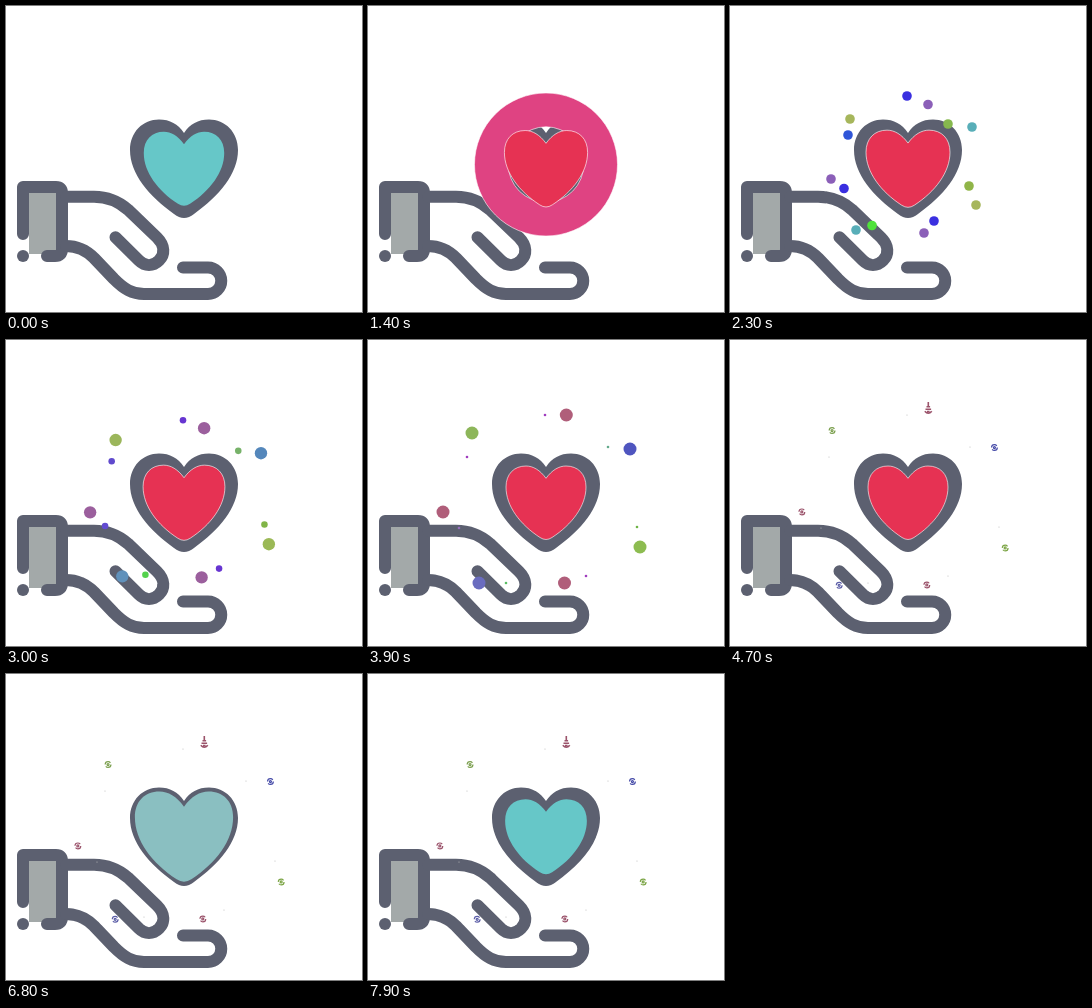
An HTML page that plays this animation: 356 by 306 pixels, repeating every 8 s.

```html
<!DOCTYPE html>
<html lang="en">
<head>
<meta charset="utf-8">
<title>Heart in hand</title>
<style>
  html, body { margin: 0; width: 100%; height: 100%; overflow: hidden; background: #fff; }
  svg { display: block; width: 100vw; height: 100vh; }
</style>
</head>
<body>
<svg viewBox="0 0 356 306">
  <rect x="23" y="186" width="30" height="62" fill="#a3a9a9"/>
  <g fill="none" stroke="#5c6070" stroke-width="12" stroke-linecap="round" stroke-linejoin="round">
    <path d="M17 228V181H50Q56 181 56 187V243Q56 250 49 250H41"/>
    <path d="M17 250h0"/>
    <path d="M60 190.7H88C102 190.7 113 195.7 122 203.7L151 231.5C159 239.5 159 248.5 153 254.5C147 260.5 139 260.5 133 254.5L109.5 231.3"/>
    <path d="M60 240C72 240 80 244 88 252L108 273C118 283 126 288 138 288H202A13.25 13.25 0 0 0 202 261.5H177"/>
  </g>
  <path fill="#5c6070" d="M178 127C172 118 164 113.5 153 113.5C137 113.5 124 126 124 144C124 168 143 190 168 208Q178 216 188 208C213 190 232 168 232 144C232 126 219 113.5 203 113.5C192 113.5 184 118 178 127Z"/>
  <path id="ring" fill-rule="evenodd" stroke="#fff" stroke-width=".6"/>
  <path id="heart" d="M178 138.3C172 130 165 126 158 126C146 126 138 134 138 147C138 166 152 184.5 172 197.5Q178 201.5 184 197.5C204 184.5 218 166 218 147C218 134 210 126 198 126C191 126 184 130 178 138.3Z"/>
  <g id="dots"></g>
  <g id="traces" fill="none"></g>
</svg>
<script>
const LOOP = 8000, STEP = 100;
const RED = [230, 50, 83], TEAL = [102, 199, 200], PALE = [138, 191, 193];
const BLUE = [58, 47, 224], PURPLE = [139, 95, 184], OLIVE = [166, 182, 91],
      SEA = [88, 174, 184], GREEN = [134, 184, 78], ROSE = [176, 94, 122], VIOLET = [160, 60, 190];

const $ = id => document.getElementById(id);
const clamp = (v, a = 0, b = 1) => Math.min(b, Math.max(a, v));
const span = (t, a, b) => clamp((t - a) / (b - a));
const lerp = (a, b, u) => a + (b - a) * u;
const mix = (a, b, u) => a.map((v, i) => lerp(v, b[i], u));
const rgb = c => `rgb(${c.map(v => Math.round(clamp(v, 0, 255)))})`;
const set = (el, attrs) => { for (const k in attrs) el.setAttribute(k, attrs[k]); };
const add = (parent, tag, attrs) => {
  const el = document.createElementNS('http://www.w3.org/2000/svg', tag);
  set(el, attrs);
  return parent.appendChild(el);
};
// Piecewise linear value through [time, value] stops
const track = (t, stops) => {
  let i = 0;
  while (i < stops.length - 2 && t > stops[i + 1][0]) i++;
  const [a, b] = [stops[i], stops[i + 1]];
  return lerp(a[1], b[1], span(t, a[0], b[0]));
};

// Each spark passes `from` at 2.3 s and `to` at 3.9 s
const spark = (big, from, to, c0, c1, steady = false) => ({ big, from, to, c0, c1, steady });
const sparks = [
  spark(true, [198, 98.5], [198.3, 75], PURPLE, ROSE, true),
  spark(true, [120, 113], [104, 93], OLIVE, [141, 182, 90]),
  spark(true, [101, 173], [75, 172], PURPLE, ROSE),
  spark(true, [126, 224], [111, 243], SEA, [106, 108, 191]),
  spark(true, [194, 227], [196.5, 243], PURPLE, ROSE),
  spark(true, [246, 199], [272, 207], OLIVE, [141, 188, 80]),
  spark(true, [242, 121], [262, 109], SEA, [79, 85, 191]),
  spark(false, [177, 90], [177, 75], BLUE, VIOLET),
  spark(false, [118, 129], [99, 117], [47, 85, 216], VIOLET),
  spark(false, [114, 182.5], [91, 188], BLUE, [150, 110, 190]),
  spark(false, [142, 219.5], [138, 243], [79, 226, 59], [90, 190, 100]),
  spark(false, [204, 215], [218, 236], BLUE, VIOLET),
  spark(false, [239, 180], [269, 187], [144, 181, 72], [110, 180, 70]),
  spark(false, [218, 118], [240, 107], GREEN, [100, 170, 140])
];
const decay = t => Math.exp(-1.1 * (t - 2300) / 1000);
const sparkPos = (s, t) => {
  const u = s.steady ? (t - 2300) / 1600 : (1 - decay(t)) / (1 - decay(3900));
  return s.from.map((v, i) => lerp(v, s.to[i], u));
};
const bigRadius = [[1800, 3.5], [2300, 4.8], [2700, 6], [3500, 6.5], [3900, 6.5], [4700, 2.5]];
const smallRadius = [[1800, 4.5], [2300, 4.8], [3900, 1.3], [4700, 0.4]];

// Faint rings stay where the big sparks burn out, specks where the small ones do
for (const s of sparks) {
  s.el = add($('dots'), 'circle', {});
  const [cx, cy] = sparkPos(s, 4700);
  const stroke = rgb(mix(s.c1, [0, 0, 0], .12));
  if (s.steady) {
    add($('traces'), 'path', { d: 'M198.3 62v4M196.5 66.7h3.6M195.5 69.2h5.6M194.8 71.3q3.5 4 7 0M197 71.5h2.6', stroke, 'stroke-width': 1.6 });
  } else if (s.big) {
    add($('traces'), 'circle', { cx, cy, r: 2.9, stroke, 'stroke-width': 1.2, 'stroke-dasharray': '7 2' });
    add($('traces'), 'circle', { cx, cy, r: 1, stroke, 'stroke-width': 1.2 });
  } else {
    add($('traces'), 'circle', { cx: s.to[0], cy: s.to[1], r: .6, fill: '#bbb' });
  }
}

function drawRing(t) {
  const visible = t >= 1000 && t < 1840;
  $('ring').style.display = visible ? '' : 'none';
  if (!visible) return;
  const r = 71.5 * (1 - (1 - span(t, 900, 1400)) ** 3);
  const u = span(t, 1200, 1840);
  const hole = r * (1 - (1 - u) ** 2);
  const circle = q => `M${178 - q} 158.5a${q} ${q} 0 1 0 ${2 * q} 0a${q} ${q} 0 1 0 ${-2 * q} 0Z`;
  set($('ring'), {
    d: circle(r) + (hole > 0 ? circle(hole) : ''),
    fill: rgb(mix([226, 38, 77], [216, 130, 248], u))
  });
}

function drawHeart(t) {
  let scale = 1, color = TEAL;
  const red = t >= 1000 && t < 6300;
  if (t >= 1000 && t < 6200) {
    color = RED;
    scale = track(t, [[900, 0], [1200, .8], [1400, 1.04], [1850, 1.09], [2300, 1.05], [3600, 1]]);
  } else if (t >= 6200 || t < 100) {
    const s = t < 100 ? t + LOOP : t;
    const swell = s < 7050
      ? Math.sin(span(s, 6130, 7050) * Math.PI / 2)
      : (1 + Math.cos(span(s, 7050, 8100) * Math.PI)) / 2;
    scale = 1 + .25 * swell;
    color = s < 6800 ? mix(RED, PALE, span(s, 6200, 6800)) : mix(PALE, TEAL, span(s, 6800, 7100));
  }
  set($('heart'), {
    transform: `translate(178 163) scale(${scale}) translate(-178 -163)`,
    fill: rgb(color),
    stroke: red ? '#fff' : 'none',
    'stroke-width': .6
  });
}

function drawSparks(t) {
  $('dots').style.display = t >= 1800 && t < 4700 ? '' : 'none';
  $('traces').style.display = t >= 4700 ? '' : 'none';
  for (const s of sparks) {
    const [cx, cy] = sparkPos(s, t);
    set(s.el, {
      cx, cy,
      r: track(t, s.big ? bigRadius : smallRadius),
      fill: rgb(mix(s.c0, s.c1, span(t, 2300, 3900)))
    });
  }
}

function draw(ms) {
  const t = Math.floor(ms % LOOP / STEP) * STEP;
  drawRing(t);
  drawHeart(t);
  drawSparks(t);
}

const start = performance.now();
const tick = () => {
  draw(performance.now() - start);
  requestAnimationFrame(tick);
};
tick();
</script>
</body>
</html>
```
